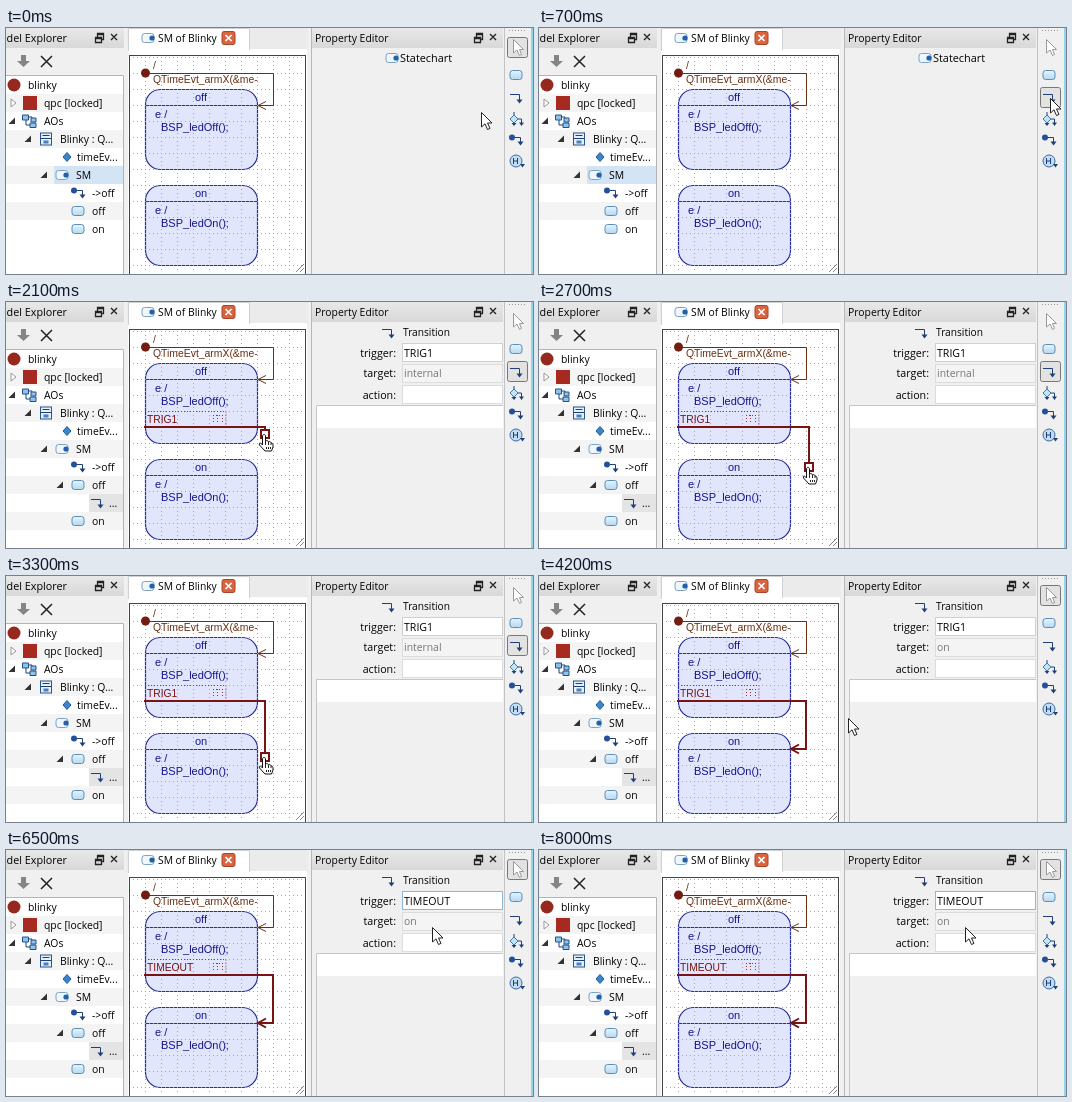
These frames come from a looping animation (527 px wide and 246 px high, 8.4 s). An HTML page:

```html
<!DOCTYPE html>
<html lang="en">
<head>
<meta charset="utf-8">
<title>State machine editor</title>
<style>
html, body { margin: 0; width: 100%; height: 100%; overflow: hidden; background: #f0f0f0; }
svg { display: block; width: 527px; height: 246px; }
text { font-family: "Open Sans", "Noto Sans", sans-serif; font-size: 10.4px; fill: #000; white-space: pre; }
.chart text { font-family: "Liberation Sans", Arial, sans-serif; font-size: 11px; fill: #14148c; }
.chart .brown { fill: #6b3013; font-size: 10.4px; }
.chart .red { fill: #7c1212; font-size: 10.3px; }
.label { font-size: 10.7px; text-anchor: end; }
.line { fill: none; stroke: #1f3f78; }
</style>
</head>
<body>
<svg id="stage" viewBox="0 0 527 246">
  <defs>
    <linearGradient id="bar" x2="0" y2="1"><stop stop-color="#e8e8e8"/><stop offset="1" stop-color="#d8d8d8"/></linearGradient>
    <linearGradient id="pill" x2="0" y2="1"><stop stop-color="#e6f4fd"/><stop offset="1" stop-color="#b4d9f0"/></linearGradient>
    <pattern id="grid" x="139" y="45" width="16" height="16" patternUnits="userSpaceOnUse">
      <path d="M.5 0V16M0 .5H16" stroke="#a3a6b8" stroke-dasharray="1 3" fill="none"/>
    </pattern>

    <g id="state"><rect x="-6" y="-4.500" width="12" height="9" rx="2.500" fill="url(#pill)" stroke="#5b8fb8"/></g>
    <g id="machine"><rect x="-6" y="-4.500" width="12" height="9" rx="2.500" fill="#eef7fd" stroke="#7aa3c4"/><circle cx="4" r="2.600" fill="#2360a8"/></g>
    <g id="trans"><path class="line" d="M-6-3.500H3.500V3"/><path d="M.5 1.500H6.500L3.500 5.500Z" fill="#1f3f78"/></g>
    <g id="init"><circle cx="-4" cy="-2.500" r="3" fill="#244f9c"/><path class="line" d="M-1-2.500H4.500V2"/><path d="M1.500 1.500H7.500L4.500 5.500Z" fill="#1f3f78"/></g>
    <g id="choice"><path class="line" d="M-2-7V-3M2 0H5.500V4M-2 4V6"/><path d="M-2-4L2 0L-2 4L-6 0Z" fill="#c2e4f5" stroke="#3f7ba8"/><path d="M-4.500 4H.5L-2 7ZM3 3.500H8L5.500 7Z" fill="#1f3f78"/></g>
    <g id="history"><circle r="6" fill="#c2ddf2" stroke="#3c6aa4"/><path class="line" d="M-2.500-3V3M1.500-3V3M-2.500 0H1.500"/><path d="M4 3H9L6.500 6.500Z" fill="#1f3f78"/></g>
    <path id="pointer" d="M.5.5V15L4 11.800L6.500 17.500L9 16.400L6.500 11H11Z" fill="#fff" stroke="#222" stroke-linejoin="round"/>
    <path id="select" d="M.5.5V14L4 11L6.500 16.500L8.500 15.500L6.500 10.500H10.500Z" fill="#fff" stroke="#999" stroke-linejoin="round"/>
    <path id="open" d="M2-3.500V3H-4.500Z" fill="#333"/>
    <path id="closed" d="M-2-4L3 0L-2 4Z" fill="#fff" stroke="#999"/>
    <g id="package"><path class="line" d="M-4-1V4H1M-1-4H2V1"/><path d="M-7.500-6H-1.500V-1H-7.500ZM1-3H6V1H1ZM0 2H6V6.500H0Z" fill="#8fc3ea" stroke="#22508c"/></g>
    <g id="class"><rect x="-5.500" y="-6" width="11" height="12" fill="#e4f0fa" stroke="#2d5489"/><path d="M-3.500-3.500H3.500M-5-.5H5" class="line"/><rect x="-2.500" y="1.500" width="5" height="3" fill="#4c7fb8"/></g>
    <path id="attr" d="M0-4.500L4 0L0 4.500L-4 0Z" fill="#3985cf" stroke="#205990"/>
    <path id="dock" d="M-5.500.5H.5V5.500H-5.500ZM-3.500.5V-3.500H2.500V2.500H.5M-5.500 1.500H.5M-3.500-2.500H2.500M10-3L16 3M16-3L10 3" fill="none" stroke="#222" stroke-width="1.300"/>

    <g id="hand">
      <path d="M-1.500 2C-1.500 0 1.500 0 1.500 2V7C3 6 4.500 7 4.500 8C6 7 7 8 7 9C8.500 9 9 10 9 11V13L7.500 17H1L-4.500 11C-5.500 9-3.500 8-1.500 11Z" transform="translate(-1)" fill="#fff" stroke="#111"/>
      <path d="M.5 7V11M3.500 8V11M6 9V11M1.500 13V15M3.500 13V15M5.500 13V15" stroke="#222"/>
    </g>
    <g id="tool">
      <path d="M-12-17L-8-13M-8-17L-12-13M-14-15H-7" stroke="#e7c64c" stroke-width="1.400"/>
      <path class="line" d="M-12-15.500H-6V-9M-9-11L-6-8L-3-11"/>
      <g fill="none" stroke="#122c66" stroke-width="1.700"><circle cy="-5" r="1.800"/><path d="M0-3V6M-3.500-1H3.500M-6 1C-5 5-3 6 0 6S5 5 6 1M-7 3L-6 0L-3 3M7 3L6 0L3 3"/></g>
    </g>
    <path id="beam" d="M-2.500 0H-1L0 1L1 0H2.500M0 1V13M-2.500 14H-1L0 13L1 14H2.500" fill="none" stroke="#222"/>
  </defs>

  <!-- explorer -->
  <rect width="118" height="246" fill="#fff"/>
  <rect width="118" height="20" fill="url(#bar)"/>
  <rect y="20" width="118" height="27" fill="#f0f0f0"/>
  <text x="61" y="14" text-anchor="end" style="font-size:10.800px">Model Explorer</text>
  <use href="#dock" x="95" y="9"/>
  <path d="M15 27H20V33H24L17.500 39L11 33H15Z" fill="#858585"/>
  <path d="M35 28L46 39M46 28L35 39" stroke="#222" stroke-width="1.500"/>
  <path d="M0 47.500H117.500V246" fill="none" stroke="#b4b4b4"/>
  <g id="tree"></g>
  <rect x="118" width="4" height="246" fill="#f0f0f0"/>

  <!-- chart -->
  <g class="chart">
    <rect x="121" width="181" height="22" fill="#ebebeb"/>
    <rect x="122" y="21" width="179" height="225" fill="#fff"/>
    <path d="M122.500 23V.5H243.500V22" fill="#fff" stroke="#d0d0d0"/>
    <use href="#machine" x="142" y="10"/>
    <text x="152" y="14" style="font:10.300px 'Open Sans',sans-serif;fill:#000">SM of Blinky</text>
    <rect x="216" y="3.500" width="13" height="13" rx="2" fill="#d9643f" stroke="#a8452a"/>
    <path d="M219.500 7L225.500 13M225.500 7L219.500 13" stroke="#fff" stroke-width="1.700"/>
    <rect x="123.500" y="27.500" width="176" height="219" fill="#fff" stroke="#444"/>
    <path d="M290 244L298 236M294 244L298 240" stroke="#888"/>
    <g id="shapes"></g>
    <rect x="124" y="28" width="175" height="217" fill="url(#grid)"/>
    <g id="words"></g>
    <path d="M140 45.500H267.500V77.500H252M260 73.500L252 77.500L260 81.500" fill="none" stroke="#6b3013"/>
    <circle cx="139.500" cy="45" r="4.500" fill="#741c12"/>
    <text class="brown" x="147" y="41">/</text>
    <text class="brown" x="147" y="55">QTimeEvt_armX(&amp;me-</text>
    <g id="link">
      <path d="M139 109.500H220V124M207.500 113V122M211.500 113V122M216.500 113V122M207 113.500H217" fill="none" stroke="#9c3434" stroke-dasharray="1 2"/>
      <text id="event" class="red" x="141" y="121"></text>
      <path id="wire" fill="none" stroke="#781414" stroke-width="2"/>
      <path id="arrow" d="M260 168.500L252 173L260 177.500" fill="none" stroke="#781414" stroke-width="2"/>
      <rect id="grip" x="-4" y="-4" width="8" height="8" fill="#fff" stroke="#781414" stroke-width="2"/>
    </g>
  </g>

  <!-- properties -->
  <rect x="302" width="196" height="246" fill="#f0f0f0"/>
  <rect x="306" width="191" height="20" fill="url(#bar)"/>
  <path d="M305.500 0V246" stroke="#b8b8b8"/>
  <text x="309" y="14">Property Editor</text>
  <use href="#dock" x="474" y="9"/>
  <g id="chartProps">
    <use href="#machine" x="386" y="30"/>
    <text x="394" y="34" style="font-size:10.900px">Statechart</text>
  </g>
  <g id="linkProps">
    <use href="#trans" x="382" y="31"/>
    <text x="397" y="34" style="font-size:10.200px">Transition</text>
    <text class="label" x="390" y="55">trigger:</text>
    <text class="label" x="390" y="75">target:</text>
    <text class="label" x="390" y="97">action:</text>
    <rect id="entry" x="396.500" y="41.500" width="100" height="18" fill="#fff" stroke="#d0d0d0"/>
    <rect x="396.500" y="62.500" width="100" height="18" fill="#f4f4f4" stroke="#dcdcdc"/>
    <rect x="396.500" y="83.500" width="100" height="18" fill="#fff" stroke="#dcdcdc"/>
    <rect x="311" y="104" width="186" height="22" fill="#fff"/>
    <path d="M310.500 246V103.500H497" fill="none" stroke="#c6c6c6"/>
    <rect id="mark" x="398" y="45" width="30" height="12" fill="#7d8088"/>
    <text id="field" x="398" y="55" style="font-size:10.600px"></text>
    <text id="target" x="398" y="75" style="fill:#757575"></text>
    <path id="caret" d="M444.500 44V57" stroke="#111"/>
  </g>

  <!-- palette -->
  <rect x="498" width="29" height="246" fill="#f0f0f0"/>
  <path d="M498.500 0V246" stroke="#c2c2c2"/>
  <path d="M503 2.500H520" stroke="#999" stroke-dasharray="1 2"/>
  <path d="M526 0V246" stroke="#91d5ec" stroke-width="2"/>
  <rect id="pressed" x="501.500" width="20" height="20" rx="2" fill="#e2e2e2" stroke="#777"/>
  <g id="palette"></g>

  <use id="cursor"/>
</svg>
<script>
const LOOP = 8400;
const $ = id => document.getElementById(id);
const use = (name, x, y) => `<use href="#${name}" x="${x}" y="${y}"/>`;
const text = (s, x, y, extra = '') => `<text x="${x}" y="${y}" ${extra}>${s}</text>`;
const show = (id, on) => $(id).style.display = on ? '' : 'none';

// label, icon, icon x, text x, expander
const rows = [
  ['blinky', 'ball', 8, 22, ''],
  ['qpc [locked]', 'brand', 24, 38, 'closed'],
  ['AOs', 'package', 24, 38, 'open'],
  ['Blinky : Q...', 'class', 40, 54, 'open'],
  ['timeEv...', 'attr', 61, 71, ''],
  ['SM', 'machine', 56, 70, 'open'],
  ['-&gt;off', 'init', 72, 86, ''],
  ['off', 'state', 72, 86, ''],
  ['on', 'state', 72, 86, '']
];
const child = ['...', 'trans', 91, 103, ''];

function icon(name, x, y) {
  if (name === 'ball') return `<circle cx="${x}" cy="${y}" r="6.500" fill="#96291f"/>`;
  if (name === 'brand') return `<rect x="${x - 7}" y="${y - 7}" width="14" height="14" fill="#a62a20"/>`;
  return use(name, x, y);
}

function tree(linked) {
  const list = linked ? [...rows.slice(0, 8), child, rows[8]] : rows;
  const chosen = linked ? 8 : 5;
  return list.map(([label, name, ix, tx, fold], i) => {
    const y = 57 + i * 18;
    if (linked && label === 'off') fold = 'open';
    let s = i % 2 ? `<rect y="${y - 9}" width="117" height="18" fill="#f4f4f4"/>` : '';
    if (i === chosen)
      s += `<rect x="${ix - 8}" y="${y - 9}" width="${125 - ix}" height="18" fill="${linked ? '#e4e4e4' : '#d3e5f5'}"/>`;
    if (fold) s += use(fold, ix - 17, y);
    return s + icon(name, ix, y) + text(label, tx, y + 4);
  }).join('');
}

const shape = y =>
  `<rect x="139.500" y="${y}" width="112" height="80" rx="15" fill="#e1e6fd" stroke="#2a2f98" stroke-width="1.200"/>
   <path d="M139.500 ${y + 16}H251.500" stroke="#2a2f98"/>`;
const words = (y, name, call) =>
  text(name, 195, y + 11.5, 'text-anchor="middle"') +
  text('e /', 149, y + 28) + text(call, 155, y + 41.5);

$('shapes').innerHTML = shape(61.5) + shape(157.5);
$('words').innerHTML = words(61.5, 'off', 'BSP_ledOff();') + words(157.5, 'on', 'BSP_ledOn();');
$('palette').innerHTML = use('select', 507, 11) +
  ['state', 'trans', 'choice', 'init', 'history'].map((n, i) => use(n, 510, [47, 70, 91, 112, 133][i])).join('');

// time, x, y, cursor shape from then on
const path = [
  [0, 475, 84, 'pointer'], [500, 511, 71, 'pointer'], [700, 511, 70, 'pointer'],
  [900, 284, 141, 'tool'], [1200, 215, 147, 'tool'], [1400, 157, 143, 'tool'],
  [1500, 157, 143, 'tool'], [1600, 155, 141, 'tool'], [1800, 155, 141, 'tool'],
  [1900, 180, 135, 'pointer'], [2100, 259, 132, 'hand'], [2700, 270, 165, 'hand'],
  [3000, 260, 179, 'hand'], [3100, 260, 179, 'hand'], [3200, 259, 181, 'hand'],
  [3300, 259, 181, 'hand'], [3600, 252, 182, 'hand'], [3700, 252, 182, 'hand'],
  [3800, 252, 180, 'hand'], [3900, 252, 180, 'hand'], [4000, 262, 180, 'pointer'],
  [4500, 380, 84, 'pointer'], [4600, 404, 64, 'beam'], [4800, 430, 45, 'beam'],
  [5100, 370, 45, 'beam'], [5200, 370, 50, ''], [5400, 400, 64, 'pointer'],
  [5600, 426, 77, 'pointer'], [LOOP, 426, 77, 'pointer']
];
const typed = [[5600, 'TIMEOUT'], [5500, 'TIMEO'], [5400, 'TIM'], [5300, 'T'], [0, 'TRIG1']];

function locate(t) {
  const i = path.findIndex(p => p[0] > t) - 1;
  const [t0, x0, y0, kind] = path[i], [t1, x1, y1] = path[i + 1];
  const k = (t - t0) / (t1 - t0);
  return { x: Math.round(x0 + (x1 - x0) * k), y: Math.round(y0 + (y1 - y0) * k), kind };
}

let last = -1, wasLinked = null;

function draw(t) {
  const linked = t >= 1900, joined = t >= 4000;
  const c = locate(t);
  if (linked !== wasLinked) {
    $('tree').innerHTML = tree(linked);
    wasLinked = linked;
  }
  show('link', linked);
  show('linkProps', linked);
  show('chartProps', !linked);
  show('arrow', joined);
  show('grip', !joined);

  const grip = t >= 2100 ? c : { x: 259, y: 132 };
  $('grip').setAttribute('transform', `translate(${grip.x} ${grip.y})`);
  $('wire').setAttribute('d', joined
    ? 'M138 125H267V173H252'
    : `M138 125H${grip.x}V${grip.y - 4}`);
  $('event').textContent = t >= 6500 ? 'TIMEOUT' : 'TRIG1';

  const marked = t >= 5100 && t < 5300;
  $('field').textContent = typed.find(e => t >= e[0])[1];
  $('field').style.fill = marked ? '#fff' : '#000';
  $('entry').style.stroke = t >= 4800 ? '#8fb6d8' : '#d0d0d0';
  $('target').textContent = joined ? 'on' : 'internal';
  show('mark', marked);
  show('caret', (t >= 5600 && t < 6100) || (t >= 6600 && t < 7000) || (t >= 7500 && t < 8000));

  $('pressed').setAttribute('y', t >= 600 && t < 4000 ? 59.5 : 9.5);
  show('cursor', c.kind);
  $('cursor').setAttribute('href', '#' + c.kind);
  $('cursor').setAttribute('transform', `translate(${c.x} ${c.y})`);
}

function tick(now) {
  const t = Math.floor(now % LOOP / 100) * 100;
  if (t !== last) draw(last = t);
  requestAnimationFrame(tick);
}
draw(0);
requestAnimationFrame(tick);
</script>
</body>
</html>
```
